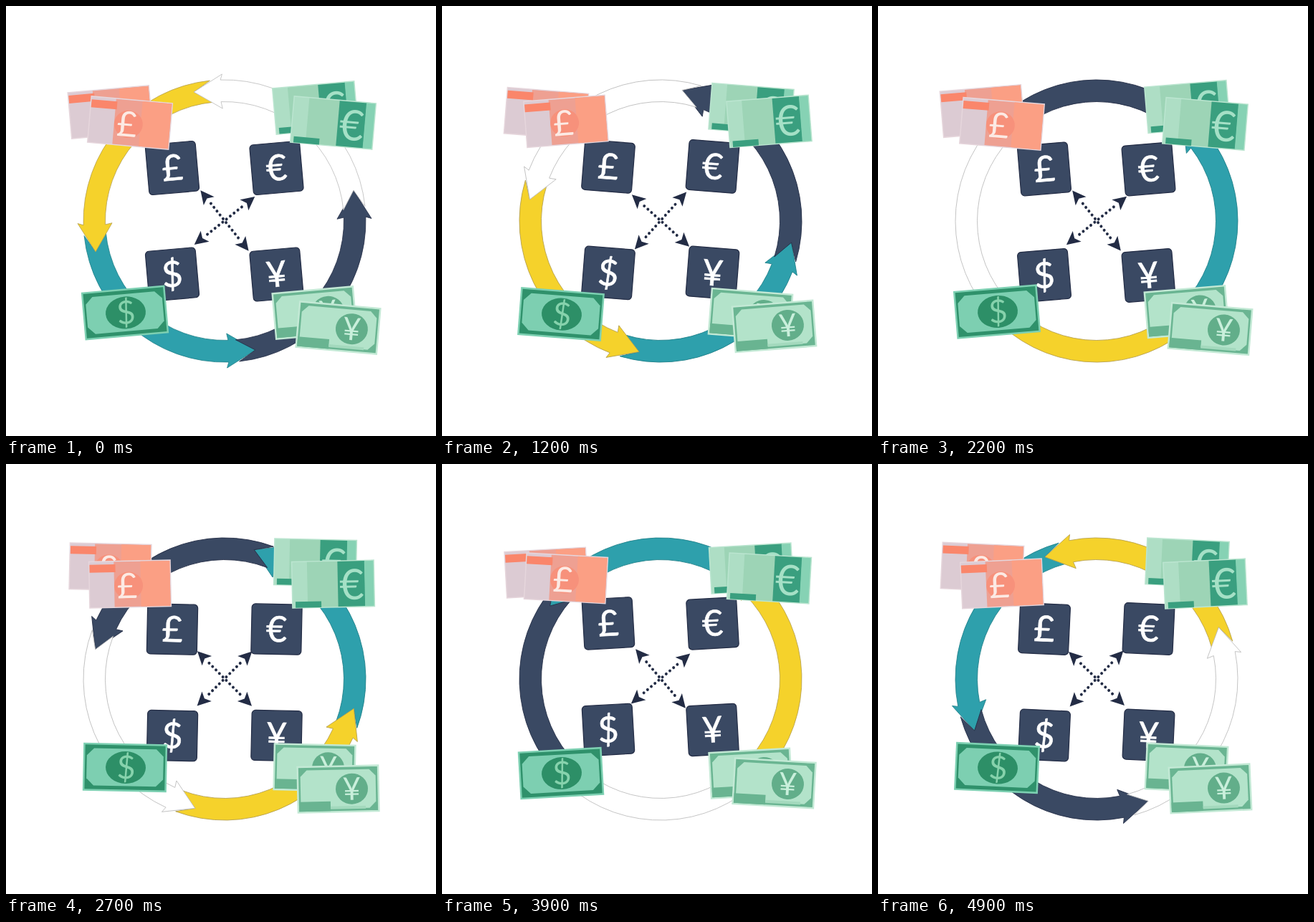
Animation, 600 px wide and 600 px high, one loop 5 s. Source, as an HTML page:

```html
<!DOCTYPE html>
<html lang="en">
<head>
<meta charset="utf-8">
<title>Currency exchange cycle</title>
<style>
  html, body { margin: 0; width: 100%; height: 100%; overflow: hidden; background: #fff; }
  svg { display: block; width: 100vw; height: 100vh; }
  text { font-family: Lato, "Open Sans", sans-serif; text-anchor: middle; }
</style>
</head>
<body>
<svg id="stage" viewBox="0 0 600 600"></svg>
<script>
const LOOP = 5000, STEP = 100;
const SPIN = 57.3;        // ring, degrees per second
const SWAY = 3;           // wobble, radians per second
const TILT = 5, BOB = 4.7, RING_TILT = 0.8;
const CX = 305, CY = 300;
const NAVY = '#3a4963', TEAL = '#2ea0ac', YELLOW = '#f5d22b', EDGE = '#232c45';

const stage = document.getElementById('stage');

function add(parent, tag, attrs, text) {
  const el = document.createElementNS('http://www.w3.org/2000/svg', tag);
  for (const key in attrs) el.setAttribute(key, attrs[key]);
  if (text) el.textContent = text;
  parent.appendChild(el);
  return el;
}

const rect = (p, x, y, width, height, fill, more) =>
  add(p, 'rect', { x, y, width, height, fill, ...more });
const ellipse = (p, cx, cy, rx, ry, fill) => add(p, 'ellipse', { cx, cy, rx, ry, fill });
const glyph = (p, char, x, y, size, fill, more) =>
  add(p, 'text', { x, y, 'font-size': size, fill, ...more }, char);

// Rectangle with cut corners, centred on the origin
function cutRect(p, w, h, cut, fill) {
  const x = w / 2, y = h / 2;
  const d = `M${-x + cut} ${-y}H${x - cut}L${x} ${-y + cut}V${y - cut}L${x - cut} ${y}` +
            `H${-x + cut}L${-x} ${y - cut}V${-y + cut}Z`;
  add(p, 'path', { d, fill });
}

function polar(r, deg) {
  const a = deg * Math.PI / 180;
  return (r * Math.cos(a)).toFixed(2) + ' ' + (r * Math.sin(a)).toFixed(2);
}

// Quarter arrow with its tip at `tip`; the notched tail fits the next head
function arrow(p, tip, fill, stroke) {
  const out = 197, mid = 185, inn = 166.5;
  const neck = tip + 11.7, barb = tip + 12.4, next = tip + 90;
  const d = `M${polar(mid, tip)}L${polar(205, barb)}L${polar(out, neck)}` +
    `A${out} ${out} 0 0 1 ${polar(out, next + 7.4)}L${polar(mid, next)}` +
    `L${polar(inn, next + 8.1)}A${inn} ${inn} 0 0 0 ${polar(inn, neck)}` +
    `L${polar(157, barb)}Z`;
  add(p, 'path', { d, fill, stroke, 'stroke-width': 0.8, 'stroke-linejoin': 'round' });
}

function poundNote(p) {
  rect(p, -57.5, -33, 115, 66, '#e6d6dc');
  rect(p, -56, -31.5, 112, 63, '#dccbd3');
  rect(p, -22, -31.5, 78, 63, '#eea092');
  rect(p, 15, -31.5, 41, 63, '#fb9f84');
  rect(p, -56, -28, 36, 11, '#fa866b');
  ellipse(p, -2, 2, 20, 19, '#f7917b');
  glyph(p, '£', -4, 19.5, 49, '#fceae4');
}

function euroNote(p) {
  rect(p, -58, -33, 116, 66, '#bbe5d0');
  rect(p, -56.5, -31.5, 113, 63, '#aedec5');
  rect(p, -36, -31.5, 43, 63, '#9dd4b6');
  rect(p, 6.5, -31.5, 38, 63, '#3a9f7f');
  rect(p, 44, -31.5, 12.5, 63, '#86d2b4');
  rect(p, -53, 23.5, 36, 8.5, '#3a9f7f');
  glyph(p, '€', 26, 22, 59, '#a5e0c6');
}

function yenNote(p) {
  rect(p, -57.5, -33, 115, 66, '#c3e9d5');
  rect(p, -55, -30.5, 110, 61, '#6ab592');
  cutRect(p, 105, 54, 9, '#b3e3ca');
  rect(p, -55, 17, 44, 13.5, '#69b491');
  rect(p, -11, 24, 49, 4, '#a3d9bd');
  ellipse(p, 19, 0, 22.5, 21.5, '#62ae8a');
  glyph(p, '¥', 19, 15.5, 44, '#c9efdb');
}

function dollarNote(p) {
  rect(p, -58.5, -33.5, 117, 67, '#7dd0b2');
  rect(p, -56, -31, 112, 62, '#2f916b');
  cutRect(p, 107, 52, 10, '#7dcfb1');
  ellipse(p, 1, 0, 28, 22.5, '#2d8f67');
  glyph(p, '$', 1.5, 15.5, 45, '#86d2ac');
}

const tile = char => p => {
  rect(p, -35, -35, 70, 70, NAVY, { rx: 5, stroke: EDGE, 'stroke-width': 1.2 });
  glyph(p, char, 0, 17.4, 50, '#fff', { stroke: '#fff', 'stroke-width': 0.7 });
};

function cross(p) {
  for (let i = 0; i < 4; i++) {
    const arm = add(p, 'g', { transform: `rotate(${i * 90 - 43.5})`, fill: EDGE });
    for (let k = 0; k < 5; k++) add(arm, 'circle', { cx: 3.4 + k * 6.8, cy: 0, r: 2 });
    add(arm, 'path', { d: 'M54 0L35 9.5L39.5 0L35 -9.5Z' });
  }
}

const ring = add(stage, 'g');
arrow(ring, 77.4, TEAL, '#1f7f88');
arrow(ring, -12.6, NAVY, EDGE);
arrow(ring, 167.4, YELLOW, '#b5a050');
arrow(ring, -102.6, '#fff', '#bbb');

// draw, x, y, direction of bob, direction of tilt
const parts = [
  [tile('£'), 232, 226, 1, -1],
  [tile('€'), 377.5, 226, 1, -1],
  [tile('$'), 232, 374.5, 1, -1],
  [tile('¥'), 377.5, 374.5, 1, -1],
  [cross, 305, 299.5, 0, 1],
  [poundNote, 145.5, 148, -1, -1],
  [poundNote, 173, 163, 1, 1],
  [euroNote, 431.5, 142, -1, -1],
  [euroNote, 456.5, 163, 1, 1],
  [yenNote, 430.5, 428, -1, -1],
  [yenNote, 463.5, 449, 1, 1],
  [dollarNote, 166, 428, -1, -1]
].map(([draw, x, y, bob, tilt]) => {
  const el = add(stage, 'g');
  draw(el);
  return { el, x, y, bob, tilt };
});

function render(ms) {
  const t = Math.floor(ms % LOOP / STEP) * STEP / 1000;
  const sin = Math.sin(SWAY * t), cos = Math.cos(SWAY * t);
  const spin = -SPIN * t - RING_TILT * cos;
  ring.setAttribute('transform', `translate(${CX} ${CY}) rotate(${spin})`);
  for (const { el, x, y, bob, tilt } of parts) {
    el.setAttribute('transform',
      `translate(${x} ${y + bob * BOB * sin}) rotate(${tilt * TILT * cos})`);
  }
}

const start = performance.now();
function tick() {
  render(performance.now() - start);
  requestAnimationFrame(tick);
}
tick();
</script>
</body>
</html>
```
